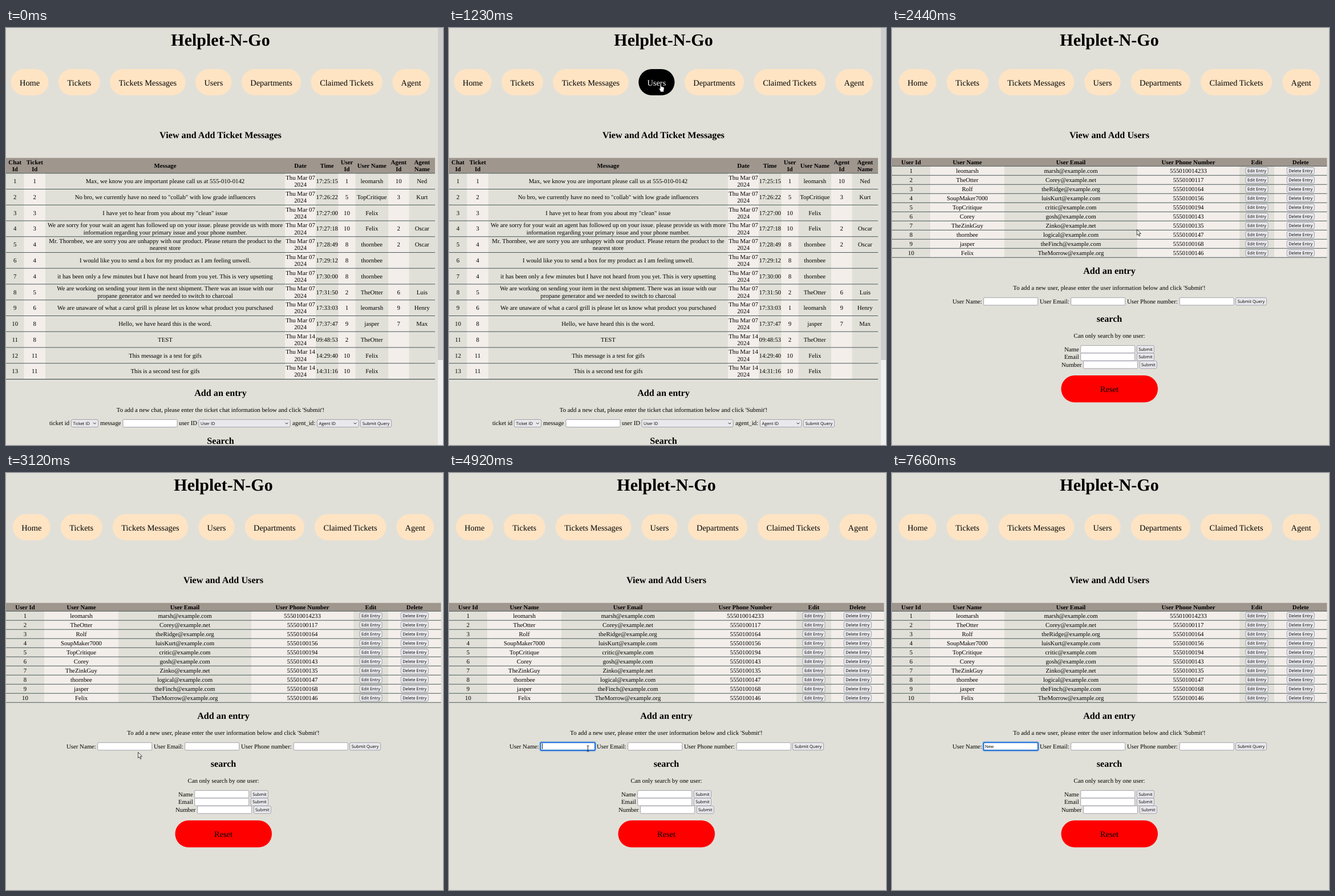
Write an HTML page that moves like this. It is 766 px wide and 731 px high and loops after 8000 ms.

```html
<!DOCTYPE html>
<html lang="en">
<head>
<meta charset="utf-8">
<title>Ticket desk</title>
<style>
  html, body { margin: 0; width: 100%; height: 100%; overflow: hidden; background: #e1e0d8; }
  svg { display: block; text-rendering: geometricPrecision; }
  text { font: 10.8px "Liberation Serif", "Times New Roman", serif; text-anchor: middle; white-space: pre; }
  text.b { font-weight: bold; }
  text.h1 { font-size: 30px; font-weight: bold; }
  text.h2 { font-size: 16.2px; font-weight: bold; }
  text.nav { font-size: 14.4px; }
  text.left { text-anchor: start; }
  text.ui { font: 7.4px "Open Sans", "Noto Sans", sans-serif; }
  .pill { fill: #ffe4c4; }
  .hover .pill { fill: #000; }
  .hover text { fill: #fff; }
  .input { fill: #fff; stroke: #8f8f9d; stroke-width: .8; }
  .input.hover { stroke: #5b5b66; }
  .button { fill: #e9e9ed; stroke: #8f8f9d; stroke-width: .8; }
  .line { stroke: #4a5a5a; stroke-width: 1.1; }
</style>
</head>
<body>
<svg id="stage" width="766" height="731" viewBox="0 0 766 731"></svg>
<script>
const LOOP = 8000, PAGE_SWAP = 1300, FOCUS = 3840, TYPING = [6460, 6720, 7120];

// ---- drawing helpers -------------------------------------------------
const rect = (x, y, w, h, attrs = "") =>
  `<rect x="${x}" y="${y}" width="${w}" height="${h}" ${attrs}/>`;
const text = (x, y, s, cls = "") => `<text x="${x}" y="${y}" class="${cls}">${s}</text>`;
const lines = (x, middle, s, cls) => String(s).split("|").map((part, i, all) =>
  text(x, middle + 3.6 + (i - (all.length - 1) / 2) * 12.2, part, cls)).join("");
const input = (x, y, id = "") => rect(x + .4, y - 6.6, 95, 13.2, `rx="1.3" class="input" id="${id}"`);
const button = (x, y, w, s, h = 13.2) =>
  rect(x + .4, y - h / 2, w - .8, h, 'rx="2.5" class="button"') + text(x + w / 2, y + 2.8, s, "ui");
const select = (x, y, w, s) =>
  rect(x + .4, y - 6.6, w - .8, 13.2, 'rx="2.5" class="button"') + text(x + 3.5, y + 2.8, s, "ui left") +
  `<path d="M${x + w - 9} ${y - 1.2}l2.4 2.4 2.4-2.4" fill="none" stroke="#222"/>`;

const NAV = [["Home", 65.6], ["Tickets", 72.8], ["Tickets Messages", 132.4], ["Users", 63.2],
  ["Departments", 104], ["Claimed Tickets", 125.2], ["Agent", 65.6]];

function header(center, heading, x, gap) {
  let out = text(center, 31, "Helplet-N-Go", "h1") + text(center, 193.3, heading, "h2");
  for (const [label, w] of NAV) {
    out += `<g class="link">${rect(x, 72, w, 46, 'rx="23" class="pill"')}${text(x + w / 2, 100.5, label, "nav")}</g>`;
    x += w + gap;
  }
  return out;
}

function table(edges, headHeight, titles, rows, pitch, cell) {
  const top = 227.7, body = top + headHeight, width = edges.at(-1), height = pitch * rows.length;
  const center = i => (edges[i] + edges[i + 1]) / 2;
  let out = rect(0, top, width, headHeight, 'fill="#9f968e"');
  titles.forEach((title, i) => {
    if (i % 2) out += rect(edges[i], body, edges[i + 1] - edges[i], height, 'fill="#f3eeea"');
    out += lines(center(i), top + headHeight / 2, title, "b");
  });
  for (let r = 0; r <= rows.length; r++) {
    const y = body + r * pitch;
    out += `<path class="line" d="M0 ${y}H${width}"/>`;
    if (r < rows.length) rows[r].forEach((s, i) => out += cell(center(i), y + pitch / 2, s, i));
  }
  return out;
}

// ---- page content ----------------------------------------------------
const MESSAGES = `1;Max, we know you are important please call us at 555-010-0142;07;17:25:15;1;leomarsh;10;Ned
2;No bro, we currently have no need to "collab" with low grade influencers;07;17:26:22;5;TopCritique;3;Kurt
3;I have yet to hear from you about my "clean" issue;07;17:27:00;10;Felix;;
3;We are sorry for your wait an agent has followed up on your issue. please provide us with more|information regarding your primary issue and your phone number.;07;17:27:18;10;Felix;2;Oscar
4;Mr. Thornbee, we are sorry you are unhappy with our product. Please return the product to the|nearest store;07;17:28:49;8;thornbee;2;Oscar
4;I would like you to send a box for my product as I am feeling unwell.;07;17:29:12;8;thornbee;;
4;it has been only a few minutes but I have not heard from you yet. This is very upsetting;07;17:30:00;8;thornbee;;
5;We are working on sending your item in the next shipment. There was an issue with our|propane generator and we needed to switch to charcoal;07;17:31:50;2;TheOtter;6;Luis
6;We are unaware of what a carol grill is please let us know what product you purschased;07;17:33:03;1;leomarsh;9;Henry
8;Hello, we have heard this is the word.;07;17:37:47;9;jasper;7;Max
8;TEST;14;09:48:53;2;TheOtter;;
11;This message is a test for gifs;14;14:29:40;10;Felix;;
11;This is a second test for gifs;14;14:31:16;10;Felix;;`.split("\n").map((row, i) => {
  const cells = row.split(";");
  cells[2] = `Thu Mar ${cells[2]}|2024`;
  return [i + 1, ...cells];
});

const USERS = `leomarsh;marsh@example.com;555010014233
TheOtter;Corey@example.net;5550100117
Rolf;theRidge@example.org;5550100164
SoupMaker7000;luisKurt@example.com;5550100156
TopCritique;critic@example.com;5550100194
Corey;gosh@example.com;5550100143
TheZinkGuy;Zinko@example.net;5550100135
thornbee;logical@example.com;5550100147
jasper;theFinch@example.com;5550100168
Felix;TheMorrow@example.org;5550100146`.split("\n").map((row, i) =>
  [i + 1, ...row.split(";"), "Edit Entry", "Delete Entry"]);

const messagesPage = header(376, "View and Add Ticket Messages", 8.8, 17.55) +
  table([0, 31.5, 69, 489, 543, 582.5, 612.5, 670, 706.5, 752], 27,
    ["Chat|Id", "Ticket|Id", "Message", "Date", "Time", "User|Id", "User Name", "Agent|Id", "Agent|Name"],
    MESSAGES, 27.76, lines) +
  text(376, 644.7, "Add an entry", "h2") +
  text(376, 672.6, "To add a new chat, please enter the ticket chat information below and click 'Submit'!") +
  text(76, 696.2, "ticket id", "left") + select(114, 693, 48, "Ticket ID") +
  text(165, 696.2, "message", "left") + input(204.6, 693) +
  text(303, 696.2, "user ID", "left") + select(337.5, 693, 161, "User ID") +
  text(502, 696.2, "agent_id:", "left") + select(545, 693, 73.5, "Agent ID") +
  button(621, 693, 55, "Submit Query") +
  text(376, 728.5, "Search", "h2") +
  rect(757, 0, 9, 731, 'fill="#f0f0f0"') + rect(757, 0, 9, 582, 'fill="#cdcdcd"');

const usersPage = header(381, "View and Add Users", 12, 18.2) +
  table([0, 67, 197, 430, 609, 670, 762.5], 14.6,
    ["User Id", "User Name", "User Email", "User Phone Number", "Edit", "Delete"], USERS, 16,
    (x, y, s, i) => i < 4 ? lines(x, y, s) : button(x - (i < 5 ? 20 : 24.5), y, i < 5 ? 40 : 49, s, 11.6)) +
  text(381, 431.3, "Add an entry", "h2") +
  text(381, 459.2, "To add a new user, please enter the user information below and click 'Submit'!") +
  text(106, 482.6, "User Name:", "left") + input(160.3, 479.3, "name") +
  text(259, 482.6, "User Email:", "left") + input(313.3, 479.3, "email") +
  text(412, 482.6, "User Phone number:", "left") + input(503.8, 479.3) +
  button(602, 479.3, 55, "Submit Query") +
  text(381, 515, "search", "h2") + text(381, 543, "Can only search by one user:") +
  [["Name", 302, 563.2], ["Email", 302, 576.6], ["Number", 297, 590.3]].map(([label, x, y]) => {
    const field = label === "Number" ? 335.2 : 330.3;
    return text(x, y + 3.4, label, "left") + input(field, y) + button(field + 98.6, y, 31, "Submit");
  }).join("") +
  rect(296.5, 609, 169.5, 47.3, 'rx="23.6" fill="red"') + text(381, 637.6, "Reset", "nav") +
  `<g id="focus" fill="none">${rect(159.4, 471.4, 97.6, 15.8, 'rx="2.6" stroke="#0060df" stroke-opacity=".3" stroke-width="2.4"')}
  ${rect(160.5, 472.5, 95.4, 13.6, 'rx="1.5" stroke="#0060df" stroke-width="1.5"')}</g>` +
  text(163, 482, "", 'ui left" id="typed') + rect(163, 474, .9, 10, 'id="caret"');

const cursors = `<g id="cursor">
  <path id="arrow" d="M0 0V10L2.3 8 3.9 11.8 5.5 11.1 3.9 7.4H7Z" fill="#fff" stroke="#111" stroke-width=".8"/>
  <path id="hand" d="M-1 1Q0-.8 1 1V5L5 6Q6.3 6.3 6.2 8L5.5 12V14.5H-.5V13L-3 9Q-3.4 7.4-1 9Z" fill="#fff" stroke="#111" stroke-width=".8"/>
  <path id="beam" d="M-2-5H-.5L0-4.5.5-5H2M0-4.5V4.5M-2 5H-.5L0 4.5.5 5H2" fill="none" stroke="#111" stroke-width=".9"/>
</g>`;

document.getElementById("stage").innerHTML =
  `<g id="messages">${messagesPage}</g><g id="users">${usersPage}</g>${cursors}`;

// ---- motion ----------------------------------------------------------
const el = id => document.getElementById(id);
const show = (id, on) => el(id).style.display = on ? "" : "none";
const usersLink = document.querySelectorAll("#messages .link")[3];

// Pointer path: time, x, y
const PATH = [[130, 616, 631], [880, 368, 100], [1090, 368, 100], [1230, 371, 97.5], [1299, 371, 97.5],
  [1300, 477.5, 145.5], [1770, 506, 382], [1970, 506, 382], [2440, 430, 352.5], [2640, 290, 488],
  [2710, 320, 478], [2850, 280, 452], [3120, 231.5, 489.5], [3400, 231.5, 489.5], [3450, 233.5, 487.5],
  [3600, 233.5, 487.5], [3780, 243.5, 483]];

function pointerAt(t) {
  const next = PATH.findIndex(p => p[0] > t);
  if (next < 1) return (next ? PATH.at(-1) : PATH[0]).slice(1);
  const [t0, x0, y0] = PATH[next - 1], [t1, x1, y1] = PATH[next], k = (t - t0) / (t1 - t0);
  return [x0 + (x1 - x0) * k, y0 + (y1 - y0) * k];
}

function render(t) {
  const first = t < PAGE_SWAP, [x, y] = pointerAt(t);
  const inside = (left, top, right, bottom) => x > left && x < right && y > top && y < bottom;
  show("messages", first);
  show("users", !first);

  const onLink = first && t >= 130 && inside(332, 72, 395, 118);
  const onName = !first && inside(160, 472, 256, 486), onEmail = !first && inside(313, 472, 409, 486);
  usersLink.classList.toggle("hover", onLink);
  el("name").classList.toggle("hover", onName);
  el("email").classList.toggle("hover", onEmail);

  show("cursor", t >= 130 && t < TYPING[0]);
  el("cursor").setAttribute("transform", `translate(${x} ${y})`);
  show("hand", onLink);
  show("beam", onName || onEmail);
  show("arrow", !onLink && !onName && !onEmail);

  // The caret starts a fresh blink at focus and at each key
  const typed = TYPING.filter(key => t >= key).length;
  const since = t - (typed ? TYPING[typed - 1] : FOCUS);
  el("typed").textContent = "New".slice(0, typed);
  el("caret").setAttribute("x", 163.2 + (typed && !first ? el("typed").getComputedTextLength() : 0));
  show("focus", t >= FOCUS);
  show("caret", since >= 0 && Math.floor(since / 540) % 2 === 0);
}

const start = performance.now();
function tick() {
  render((performance.now() - start) % LOOP);
  requestAnimationFrame(tick);
}
tick();
</script>
</body>
</html>
```
